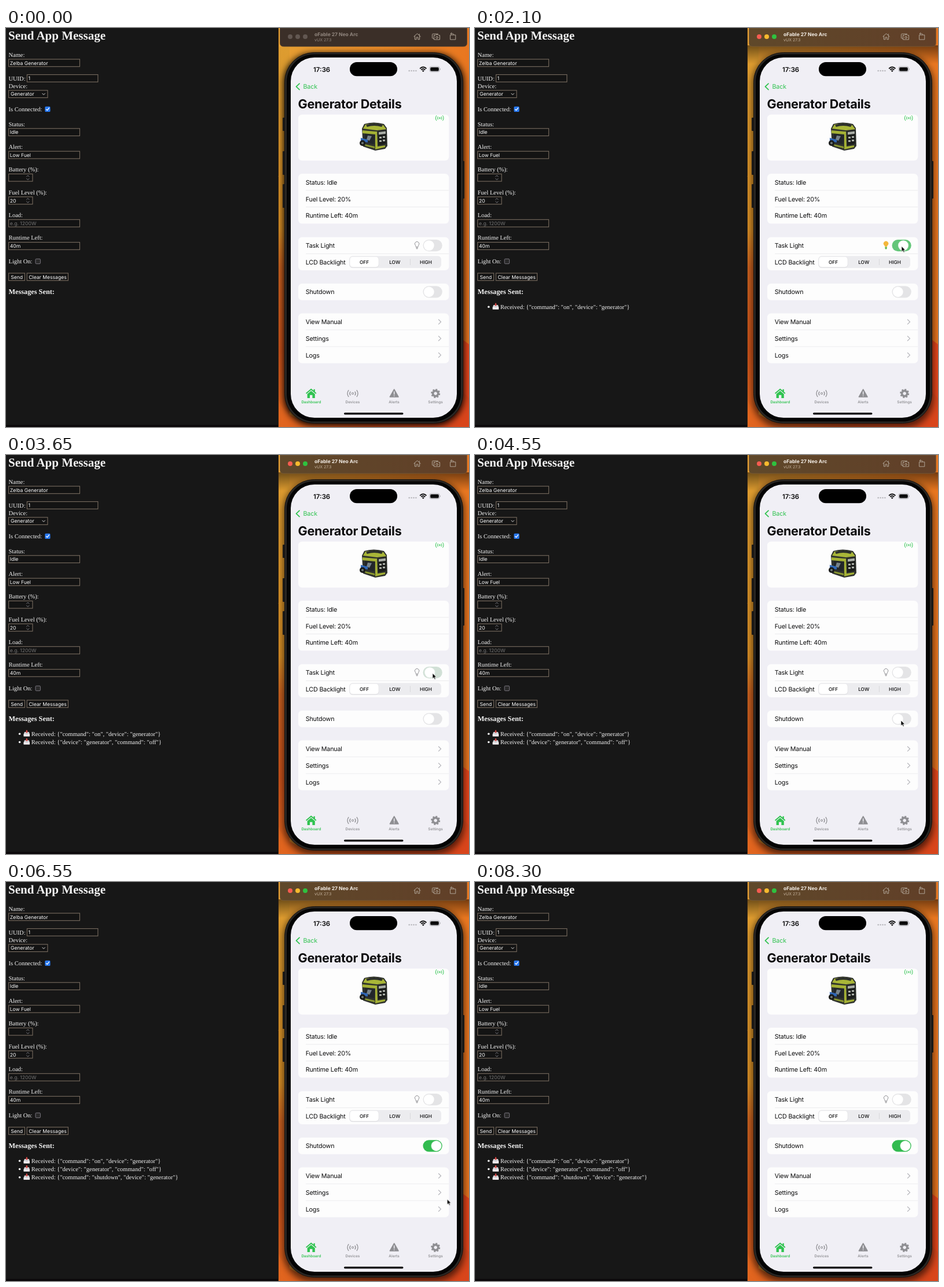
An HTML page that plays this animation: 800 px wide and 690 px high, repeating every 8.4 s.

```html
<!DOCTYPE html>
<html lang="en">
<head>
<meta charset="utf-8">
<title>Send App Message</title>
<style>
  html, body { margin: 0; width: 100%; height: 100%; overflow: hidden; background: #171717; }
  svg { display: block; width: 100%; height: 100%; }
  text { text-rendering: geometricPrecision; white-space: pre; }
  .page { font: 10.47px "Liberation Serif", serif; fill: #f4f4f4; }
  .control { font: 8.6px Inter, sans-serif; fill: #fff; }
  .hint { fill: #747474; }
  .box { fill: #131313; stroke: #75695d; stroke-width: 1.15; }
  .app { font: 10.75px Inter, sans-serif; letter-spacing: -.016em; fill: #0b0b0c; }
  .heading { font-size: 21.6px; font-weight: 700; letter-spacing: -.014em; }
  .clock { font-size: 11.4px; font-weight: 600; letter-spacing: 0; }
  .segment { font-size: 8.3px; font-weight: 500; text-anchor: middle; letter-spacing: 0; }
  .tab { font-size: 6.4px; font-weight: 600; text-anchor: middle; letter-spacing: 0; fill: #929296; }
  .green { fill: #30c350; }
  .bar { font-family: Inter, sans-serif; }
  .line { fill: none; stroke-linecap: round; stroke-linejoin: round; }

  .anim, .anim * { animation-duration: 8.4s; animation-iteration-count: infinite; }
  .active { animation-name: activate; animation-timing-function: step-end; }
  .inactive { animation-name: deactivate; animation-timing-function: step-end; }
  .msg { animation-timing-function: step-end; opacity: 0; }
  .msg:nth-child(1) { animation-name: first; }
  .msg:nth-child(2) { animation-name: second; }
  .msg:nth-child(3) { animation-name: third; }
  .light .track { animation-name: light-track; }
  .light .knob { animation-name: light-knob; }
  .bulb-on { animation-name: bulb-on; animation-timing-function: step-end; }
  .bulb-off { animation-name: bulb-off; animation-timing-function: step-end; }
  .power .track { animation-name: power-track; }
  .power .knob { animation-name: power-knob; }
  .cursor { animation-name: point; animation-timing-function: ease-in-out; }

  @keyframes activate { 0% { opacity: 0 } 20.8%, 100% { opacity: 1 } }
  @keyframes deactivate { 0% { opacity: 1 } 20.8%, 100% { opacity: 0 } }
  @keyframes first { 0% { opacity: 0 } 25%, 100% { opacity: 1 } }
  @keyframes second { 0% { opacity: 0 } 43%, 100% { opacity: 1 } }
  @keyframes third { 0% { opacity: 0 } 60.7%, 100% { opacity: 1 } }
  @keyframes light-track { 0%, 23.8%, 44.6%, 100% { fill: #e4e4e6 } 26.6%, 41.7% { fill: #32bb50 } }
  @keyframes light-knob { 0%, 23.8%, 44.6%, 100% { transform: none } 26.6%, 41.7% { transform: translateX(12.7px) } }
  @keyframes bulb-on { 0%, 41.9%, 100% { opacity: 0 } 24.2% { opacity: 1 } }
  @keyframes bulb-off { 0%, 41.9%, 100% { opacity: 1 } 24.2% { opacity: 0 } }
  @keyframes power-track { 0%, 59.5% { fill: #e4e4e6 } 62.2%, 100% { fill: #32bb50 } }
  @keyframes power-knob { 0%, 59.5% { transform: none } 62.2%, 100% { transform: translateX(12.7px) } }
  @keyframes point {
    0%, 10% { transform: translate(700px, 700px) }
    16.2%, 18.5% { transform: translate(731px, 377.5px) }
    21%, 46.4% { transform: translate(737px, 377.5px) }
    52%, 57% { transform: translate(736px, 459px) }
    59%, 75% { transform: translate(736px, 457.5px) }
    82%, 100% { transform: translate(806px, 700px) }
  }
</style>
</head>
<body>
<svg viewBox="0 0 800 690">
  <defs>
    <linearGradient id="wall" x2="1" y2=".25">
      <stop stop-color="#e6a033"/><stop offset=".55" stop-color="#ec8a28"/><stop offset="1" stop-color="#e8741f"/>
    </linearGradient>
    <linearGradient id="leftEdge" x2="0" y2="1">
      <stop stop-color="#dd9c30"/><stop offset=".48" stop-color="#d68d25"/><stop offset=".58" stop-color="#c9601f"/>
      <stop offset=".8" stop-color="#cb521a"/><stop offset="1" stop-color="#e2661f"/>
    </linearGradient>
    <linearGradient id="floor">
      <stop stop-color="#e2661f"/><stop offset=".5" stop-color="#cb4a18"/><stop offset="1" stop-color="#d9451b"/>
    </linearGradient>
    <linearGradient id="barActive"><stop stop-color="#5f482a"/><stop offset="1" stop-color="#613f28"/></linearGradient>
    <linearGradient id="shade" x2="0" y2="1"><stop stop-opacity=".5"/><stop offset="1" stop-opacity="0"/></linearGradient>
    <filter id="soft" x="-20%" y="-20%" width="140%" height="140%"><feGaussianBlur stdDeviation="6"/></filter>
    <clipPath id="desk"><path d="M470 0H800V690H470Z"/></clipPath>
    <g id="waves" class="line">
      <circle r="1.2" stroke-width=".8"/>
      <path d="M-3.1-2.3Q-4.7 0-3.1 2.3M3.1-2.3Q4.7 0 3.1 2.3M-5.5-4.2Q-8.4 0-5.5 4.2M5.5-4.2Q8.4 0 5.5 4.2"/>
    </g>
    <g id="tray">
      <path d="M1.6 3.2H9.4L10.7 7V10.6H.3V7Z" fill="#d3d3d8"/><path d="M.3 6.8H3.4L4.2 8H6.8L7.6 6.8H10.7V10.6H.3Z" fill="#f3eef0"/>
      <path d="M4.5 0H6.5V2.6H8L5.5 5.3 3 2.6H4.5Z" fill="#db4a46"/>
    </g>
  </defs>

  <rect width="800" height="690" fill="#171717"/>
  <rect y="686.5" width="470" height="3.5" fill="#0b080a"/>
  <g class="page">
    <text x="4" y="19.5" font-size="21" font-weight="700">Send App Message</text>
    <text x="4.5" y="459.5" font-size="12.27" font-weight="700">Messages Sent:</text>
    <g id="form"></g>
    <g id="messages" class="anim"></g>
  </g>

  <g clip-path="url(#desk)">
    <rect x="470" width="330" height="690" fill="url(#wall)"/>
    <rect x="470" y="33" width="20" height="657" fill="url(#leftEdge)"/>
    <path d="M788 538L800 547V690H788Z" fill="#e4451b"/>
    <path d="M470 640Q480 675 530 682H750Q788 670 790 630L800 640V690H470Z" fill="url(#floor)"/>
    <g class="anim">
      <rect class="inactive" x="480" y="44" width="311" height="643" rx="50" filter="url(#soft)" opacity=".3"/>
      <g class="active">
        <rect x="479" y="46" width="313" height="645" rx="50" filter="url(#soft)" opacity=".6"/>
        <rect x="470" y="30" width="330" height="32" fill="url(#shade)"/>
      </g>
    </g>
    <path d="M470.5 0V690" stroke="#2d2013"/>
  </g>

  <g class="bar anim">
    <g class="inactive">
      <path d="M473.5 0H796.5V26Q796.5 32 790 32H480Q473.5 32 473.5 26Z" fill="#3b2f28" stroke="#54432f" stroke-width=".7"/>
      <g fill="#625751"><circle cx="491" cy="15" r="4"/><circle cx="504" cy="15" r="4"/><circle cx="517" cy="15" r="4"/></g>
      <g fill="#92877f"><text x="533" y="14" font-size="8.5" font-weight="700">oFable 27 Neo Arc</text><text x="533" y="22.8" font-size="7">vUX 27.3</text></g>
    </g>
    <g class="active">
      <path d="M473.5 0H796.5V26Q796.5 32 790 32H480Q473.5 32 473.5 26Z" fill="url(#barActive)" stroke="#7d5f3a" stroke-width=".7"/>
      <circle cx="491" cy="15" r="4" fill="#f75c51"/><circle cx="504" cy="15" r="4" fill="#f6b92e"/><circle cx="517" cy="15" r="4" fill="#2fc13f"/>
      <g fill="#f4eee7"><text x="533" y="14" font-size="8.5" font-weight="700">oFable 27 Neo Arc</text><text x="533" y="22.8" font-size="7" fill="#c4b29c">vUX 27.3</text></g>
    </g>
    <g class="line" stroke="#b0a496" stroke-width="1">
      <path d="M704.7 14.8L710.5 9.7 716.3 14.8M706.4 13.8V19.8H709.1V16H711.9V19.8H714.6V13.8M714.2 12.5V10.3"/>
      <path d="M739 18H737.5Q736.5 18 736.5 17V11.3Q736.5 10.2 737.7 10.2H746.5"/>
      <path d="M740 12.5H742L743 11.5H746.5L747.5 12.5H749.5V20H739.5V12.5Z"/><circle cx="744.6" cy="16.2" r="1.8"/>
      <path d="M768 12H776.8V20H768ZM768.3 9.8H771.5Q773.6 9.8 773.6 11.8M770 8L768.2 9.8 770 11.5"/>
    </g>
  </g>

  <g fill="#1b1917">
    <rect x="478" y="155" width="5" height="23" rx="1"/><rect x="478" y="213" width="5" height="41" rx="1"/>
    <rect x="478" y="270" width="5" height="41" rx="1"/><rect x="788" y="230" width="4" height="65" rx="1"/>
  </g>
  <rect x="481.5" y="42.5" width="308" height="641" rx="51" fill="#2a2724" stroke="#141210"/>
  <rect x="485" y="45.5" width="301" height="635" rx="47.5" fill="#040404"/>
  <rect x="492" y="51" width="287" height="623" rx="41" fill="#f0eff5"/>
  <rect x="594" y="59" width="82" height="24.3" rx="12.1"/>
  <rect x="584" y="665.2" width="102.5" height="3.2" rx="1.6"/>
  <g id="cards" fill="#fdfdfd"></g>

  <g class="app">
    <text class="clock" x="531" y="75.5">17:36</text>
    <g fill="#b9b8bd"><circle cx="696.7" cy="74" r="1.3"/><circle cx="700.6" cy="74" r="1.3"/><circle cx="704.5" cy="74" r="1.3"/><circle cx="708.4" cy="74" r="1.3"/></g>
    <path d="M715.2 70.2Q720.8 64.8 726.4 70.2M717.3 72.4Q720.8 69.2 724.3 72.4" fill="none" stroke="#080808" stroke-width="1.9"/>
    <path d="M718.7 73.8Q720.8 72 722.9 73.8L720.8 76Z"/>
    <rect x="732" y="66.7" width="17" height="9" rx="2.8" fill="none" stroke="#9b9a9f" stroke-width=".8"/>
    <rect x="733.2" y="67.9" width="14.6" height="6.6" rx="1.8"/><path d="M750.2 69.5Q751.8 71.2 750.2 73Z" fill="#9b9a9f"/>
    <path d="M507 96.2L501.5 101.4 507 106.6" class="line" stroke="#30c350" stroke-width="1.8"/>
    <text class="green" x="513.5" y="105.3">Back</text>
    <text class="heading" x="504.5" y="139">Generator Details</text>
    <g id="rows"></g>
    <path d="M518 280.7H765M518 309.5H765M518 390.4H765M518 522H765M518 551H765" stroke="#e4e4e7" stroke-width=".7"/>
    <g class="line" stroke="#b8b8bd" stroke-width="1.3"><path d="M747.5 504.3L751.5 508.2 747.5 512.1M747.5 533L751.5 536.9 747.5 540.8M747.5 561.7L751.5 565.6 747.5 569.5"/></g>

    <rect x="593" y="394.3" width="159" height="20.8" rx="5.8" fill="#ececef"/>
    <rect x="594" y="395.6" width="50" height="18.6" rx="5" fill="#000" opacity=".14"/>
    <rect x="594" y="395.2" width="50" height="18.6" rx="5" fill="#fff" stroke="#dedee1" stroke-width=".5"/>
    <path d="M698.5 399.5V410" stroke="#d3d3d7" stroke-width=".8"/>
    <text class="segment" x="619" y="407.8" font-weight="600">OFF</text>
    <text class="segment" x="671.7" y="407.8">LOW</text><text class="segment" x="725.4" y="407.8">HIGH</text>

    <g class="anim">
      <g class="light"><rect class="track" x="720.5" y="366" width="33.3" height="20.2" rx="10.1"/><circle class="knob" cx="730.8" cy="376.1" r="8.9" fill="#fff"/></g>
      <g class="power"><rect class="track" x="720.5" y="446.2" width="33.3" height="20.2" rx="10.1"/><circle class="knob" cx="730.8" cy="456.3" r="8.9" fill="#fff"/></g>
      <g class="bulb-off line" stroke="#858589" stroke-width=".9"><path d="M708.5 378.5Q708.3 376.8 707.2 375.5A3.7 3.7 0 1 1 713 375.5Q711.9 376.8 711.7 378.5ZM708.6 380H711.6M709.2 381.7H711"/></g>
      <g class="bulb-on"><path d="M708.3 378.3Q708.1 376.8 706.9 375.6A4.2 4.2 0 1 1 713.3 375.6Q712.1 376.8 711.9 378.3Z" fill="#f4b73b"/><path d="M708.4 378.4H711.8V381L711 382.4H709.2L708.4 381Z" fill="#65b94f"/></g>
    </g>

    <use href="#waves" x="749.2" y="155.8" stroke="#30c350" stroke-width="1"/>
    <g transform="translate(611 162)">
      <path d="M4 12L8 4Q24-1 42 4L47 11 48 42 44 47 27 50 6 43Z" fill="#30332e"/>
      <path d="M6 12L10 5 26 3 41 6 46 13 30 15Z" fill="#a9b638"/>
      <path d="M11 6Q25 0 40 6L38 9Q25 5 13 9Z" fill="#2b2e2a"/>
      <path d="M5 15L27 17 27 22 5 20ZM27 17H30L31 43 44 41V44L27 48Z" fill="#a4b135"/>
      <path d="M9 21L26 23 25 39 8 36Z" fill="#22262a"/>
      <path d="M14 24L21 25 17 33 12 31Z" fill="#77838a"/>
      <path d="M32 17L46 15 46 38 32 41Z" fill="#1b1d1b"/>
      <path d="M33 18L45 16.5V21L33 22.5ZM34 26H38V29H34ZM40 25H44V28H40ZM34 32H38V35H34ZM40 31H44V34H40Z" fill="#a9ada6"/>
      <path d="M2 28L14 31V36L2 34Z" fill="#2f66b5"/><path d="M9 39L26 43 26 46 10 42Z" fill="#8b992f"/>
      <circle cx="5" cy="37" r="5" fill="#191b1a"/><circle cx="5" cy="37" r="2" fill="#6f7774"/>
    </g>

    <path d="M527.2 623.5L518 631.2 519.2 632.7 527.2 626 535.2 632.7 536.4 631.2 533.8 629V624.8H531.5V627ZM520.6 633L527.2 627.6 533.8 633V640H529.4V634.7H525V640H520.6Z" class="green"/>
    <use href="#waves" transform="translate(599 632) scale(1.3)" stroke="#8f8f93" stroke-width="1"/>
    <path d="M670.7 625L678 638H663.4Z" fill="#8f8f93" stroke="#8f8f93" stroke-width="1.6" stroke-linejoin="round"/>
    <path d="M670.7 629V633.6M670.7 635.9V636.3" class="line" stroke="#f0eff5" stroke-width="1.5"/>
    <g transform="translate(742.2 632)" fill="none" stroke="#8f8f93">
      <circle r="4.6" stroke-width="3.6"/><circle r="6.9" stroke-width="2.2" stroke-dasharray="2.9 2.52"/>
    </g>
    <text class="tab green" x="527.3" y="649">Dashboard</text><text class="tab" x="598.9" y="649">Devices</text>
    <text class="tab" x="670.6" y="649">Alerts</text><text class="tab" x="742" y="649">Settings</text>
  </g>

  <g class="anim"><path class="cursor" d="M0 0V9.3L2.2 7.3 3.7 10.6 5.3 9.9 3.8 6.7H6.8Z" fill="#050505" stroke="#fff" stroke-width=".7"/></g>
</svg>
<script>
  const byId = id => document.getElementById(id);
  const label = (y, text) => `<text x="4.5" y="${y}">${text}</text>`;
  const field = (x, y, w, text = "", hint = "") =>
    `<rect class="box" x="${x + .6}" y="${y}" width="${w - 1.2}" height="12.7"/>
     <text class="control ${hint}" x="${x + 2.7}" y="${y + 9.6}">${text}</text>`;
  const arrows = y => `<path class="line" d="M35.6 ${y + 4.7}l2.2-2.2 2.2 2.2M35.6 ${y + 8}l2.2 2.2 2.2-2.2" stroke="#8d8d96" stroke-width=".9"/>`;

  byId("form").innerHTML = [
    label(49.7, "Name:"), field(4, 54, 124, "Zelba Generator"),
    label(90.7, "UUID:"), field(35.8, 80.6, 123.6, "1"),
    label(103.7, "Device:"), field(4, 107.8, 68.5),
    `<text class="control" x="8" y="117.4">Generator</text>
     <path class="line" d="M62.8 113.2l2.3 2.3 2.3-2.3" stroke="#ddd"/>`,
    label(144, "Is Connected:"),
    `<rect x="67.3" y="135.8" width="9.2" height="9.2" rx="1.6" fill="#2878ef"/>
     <path class="line" d="M69.4 140.6l1.8 1.8 3.3-4.3" stroke="#fff" stroke-width="1.3"/>`,
    label(169.5, "Status:"), field(4, 173.8, 124, "Idle"),
    label(208.9, "Alert:"), field(4, 213.2, 124, "Low Fuel"),
    label(248.3, "Battery (%):"), field(4, 252.4, 42.5), arrows(252.4),
    label(287.6, "Fuel Level (%):"), field(4, 292, 42.5, "20"), arrows(292),
    label(327, "Load:"), field(4, 331.3, 124, "e.g. 1200W", "hint"),
    label(366.4, "Runtime Left:"), field(4, 370.6, 124, "40m"),
    label(407.4, "Light On:"),
    `<rect x="51" y="399.3" width="8.4" height="8.4" rx="1.4" fill="#292929" stroke="#85808b" stroke-width=".9"/>`,
    field(4, 424, 29), field(35.6, 424, 72.4),
    `<text class="control" x="8.2" y="433.6">Send</text><text class="control" x="39.3" y="433.6">Clear Messages</text>`
  ].join("");

  const messages = [
    '{"command": "on", "device": "generator"}',
    '{"device": "generator", "command": "off"}',
    '{"command": "shutdown", "device": "generator"}'
  ];
  byId("messages").innerHTML = messages.map((body, i) =>
    `<g class="msg"><g transform="translate(0 ${i * 14.2})">
       <circle cx="23.6" cy="482.3" r="1.8"/><use href="#tray" x="30.3" y="475.8"/>
       <text x="43.7" y="485.5">Received: ${body}</text></g></g>`).join("");

  const cards = [[149.7, 79.5], [252, 86.3], [361.7, 57.2], [442, 28.7], [493.5, 86.2]];
  byId("cards").innerHTML = cards.map(([y, h]) =>
    `<rect x="505" y="${y}" width="260.3" height="${h}" rx="6.5"/>`).join("");

  const rows = [
    [270.8, "Status: Idle"], [299.5, "Fuel Level: 20%"], [328.2, "Runtime Left: 40m"],
    [380, "Task Light"], [408.7, "LCD Backlight"], [460.2, "Shutdown"],
    [512, "View Manual"], [540.7, "Settings"], [569.5, "Logs"]
  ];
  byId("rows").innerHTML = rows.map(([y, text]) => `<text x="517.7" y="${y}">${text}</text>`).join("");
</script>
</body>
</html>
```
